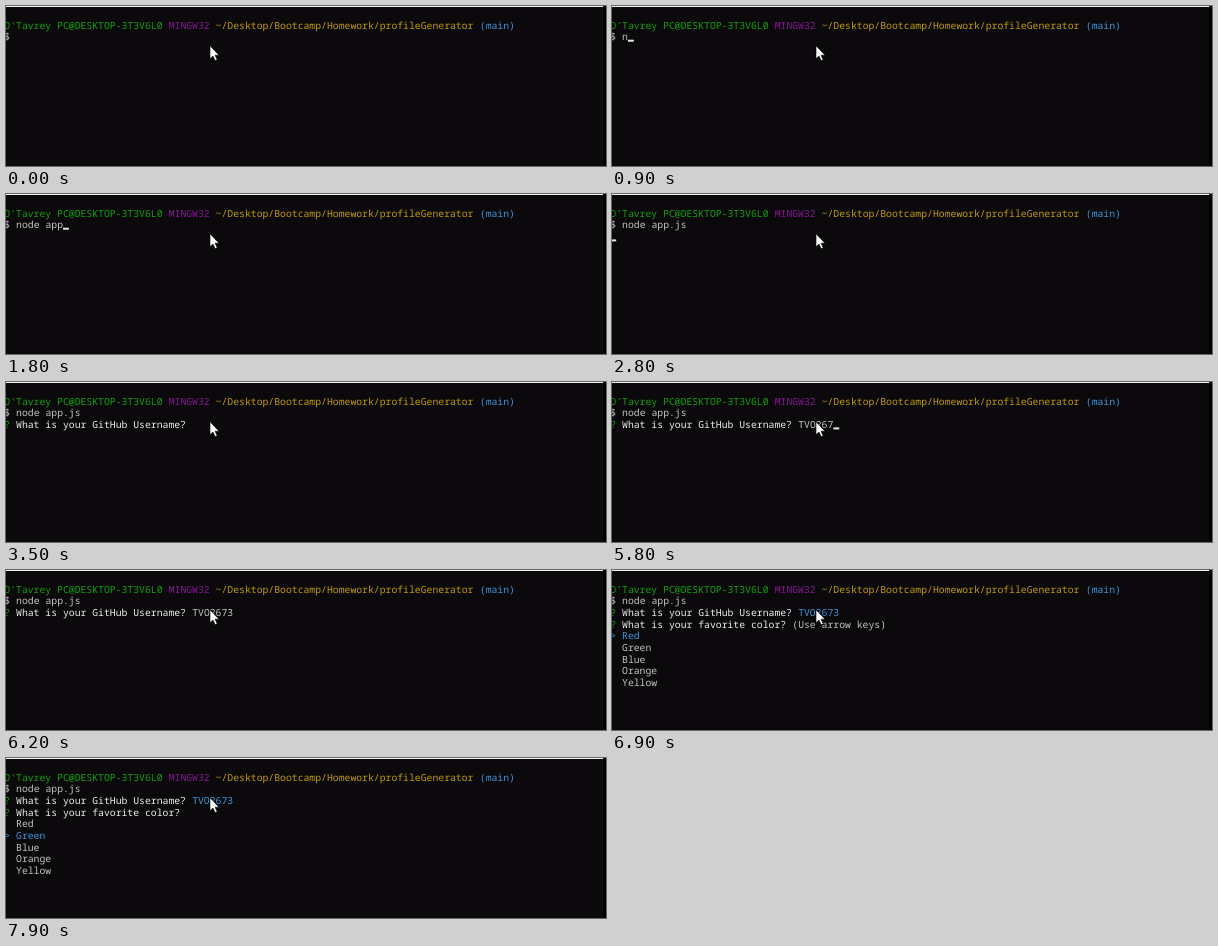
Write an HTML page that moves like this. It is 600 px wide and 160 px high and loops after 8 s.

```html
<!DOCTYPE html>
<html lang="en">
<head>
<meta charset="utf-8">
<title>Terminal prompt</title>
<style>
  html, body { margin: 0; width: 100%; height: 100%; overflow: hidden; background: #0b090b; }
  svg { display: block; width: 600px; height: 160px; }
  text {
    font: 500 9.783px "Noto Sans Mono", "DejaVu Sans Mono", monospace;
    text-rendering: geometricPrecision;
    white-space: pre;
  }
</style>
</head>
<body>
<svg viewBox="0 0 600 160">
  <rect width="600" height="160" fill="#0b090b"/>
  <rect x="597" width="3" height="160" fill="#000"/>
  <rect width="597" height="1" fill="#f4f4f4"/>
  <g id="screen"></g>
  <path d="M204 39.7v13l3-2.7 2.1 4.7 2.1-1-2.1-4.5h3.9z"
        fill="#fff" stroke="#000" stroke-width=".6"/>
</svg>
<script>
const LOOP = 8000;
const CELL = 5.87, LINE = 11.7, LEFT = -1.7, BASELINE = 22.5;
const GREEN = '#13a10e', PURPLE = '#881798', GOLD = '#c19c00',
      BLUE = '#3a96dd', GREY = '#c4c4c4', WHITE = '#eeeeee';
const screen = document.getElementById('screen');

// Adds an element to a terminal cell, visible only from `from` to `to` (ms).
function add(tag, col, row, dy, attrs, from = 0, to = LOOP) {
  const el = document.createElementNS('http://www.w3.org/2000/svg', tag);
  const place = { x: LEFT + col * CELL, y: BASELINE + row * LINE + dy };
  for (const [name, value] of Object.entries({ ...place, ...attrs })) el.setAttribute(name, value);
  screen.append(el);
  if (from > 0 || to < LOOP) {
    const easing = 'step-end';
    el.animate([
      { offset: 0, opacity: 0, easing },
      { offset: from / LOOP, opacity: 1, easing },
      { offset: to / LOOP, opacity: 0, easing },
      { offset: 1, opacity: 0 }
    ], { duration: LOOP, iterations: Infinity });
  }
  return el;
}

function write(col, row, string, fill, from, to) {
  add('text', col, row, 0, { fill }, from, to).textContent = string;
}

function cursor(col, row, from, to) {
  add('rect', col, row, -0.5, { width: CELL, height: 2, fill: '#e6e6e6' }, from, to);
}

// Types evenly from `start`; the cursor follows and rests at the end until `rest`.
function type(col, row, string, start, step, rest, until) {
  [...string].forEach((char, i) => {
    const time = start + i * step;
    const last = i === string.length - 1;
    write(col + i, row, char, GREY, time, until);
    cursor(col + i + 1, row, time, last ? rest : time + step);
  });
}

// Shell prompt
write(0, 0, "O'Tavrey PC@DESKTOP-3T3V6L0", GREEN);
write(28, 0, 'MINGW32', PURPLE);
write(36, 0, '~/Desktop/Bootcamp/Homework/profileGenerator', GOLD);
write(81, 0, '(main)', BLUE);
write(0, 1, '$', GREY);
cursor(2, 1, 200, 700);
type(2, 1, 'node app', 900, 110, 2000);
type(10, 1, '.js', 2000, 240, 2800);

// First question
const asked = 3000, answered = 6400;
cursor(0, 2, 2800, asked);
write(0, 2, '?', GREEN, asked);
write(2, 2, 'What is your GitHub Username?', WHITE, asked);
cursor(32, 2, asked, 3400);
cursor(32, 2, 3900, 4300);
type(32, 2, 'TVO', 4300, 200, 4900, answered);
cursor(35, 2, 5200, 5300);
type(35, 2, '2673', 5300, 240, 6200, answered);
write(32, 2, 'TVO2673', BLUE, answered);

// Second question: the selection moves down once
const shown = 6500, moved = 7400;
write(0, 3, '?', GREEN, shown);
write(2, 3, 'What is your favorite color?', WHITE, shown);
write(31, 3, '(Use arrow keys)', GREY, shown, moved);

function menu(selected, from, to) {
  write(0, 4 + selected, '>', BLUE, from, to);
  ['Red', 'Green', 'Blue', 'Orange', 'Yellow'].forEach((name, i) =>
    write(2, 4 + i, name, i === selected ? BLUE : GREY, from, to));
}
menu(0, shown, moved);
menu(1, moved);
</script>
</body>
</html>
```
